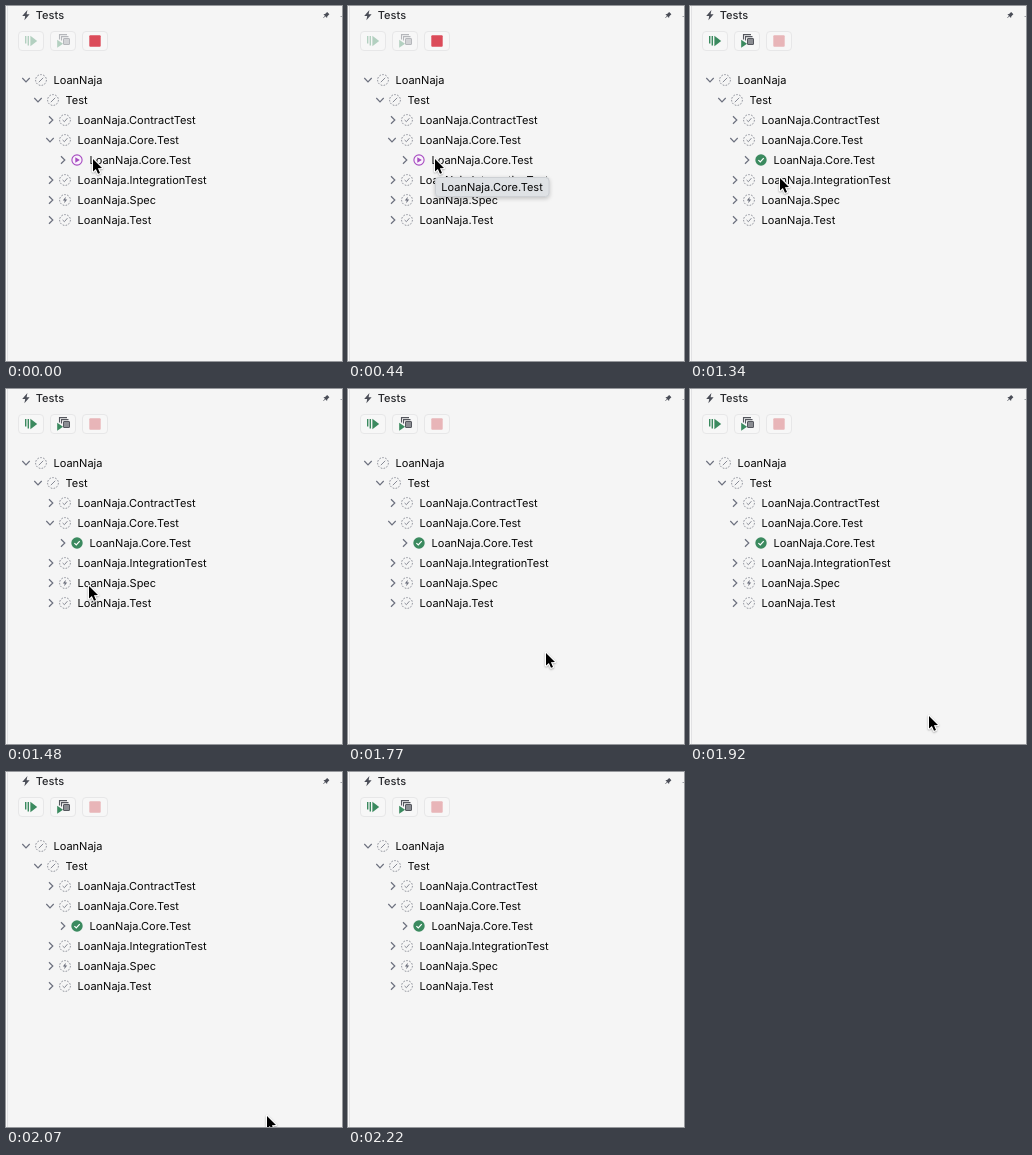
These frames come from a looping animation (336x355 px, 2510 ms). An HTML page with a canvas:

```html
<!DOCTYPE html>
<html lang="en">
<head>
<meta charset="utf-8">
<title>Test tree</title>
<style>
  html, body { margin: 0; width: 100%; height: 100%; overflow: hidden; background: #f5f5f5; }
  canvas { display: block; width: 336px; height: 355px; }
</style>
</head>
<body>
<canvas id="stage"></canvas>
<script>
const W = 336, H = 355, LOOP = 2510;
const TIP_AT = 440, DONE_AT = 1340;

// Pointer position from each time on; it is off stage after the last one.
const POINTER = [
  [0, 85, 152], [1340, 88, 171], [1480, 81, 196], [1630, 81, 169],
  [1770, 196, 263], [1920, 237, 326], [2070, 259, 343], [2220, 400, 400]
];

// Rows: label, icon x, y, chevron, mark
const ROWS = [
  ['LoanNaja', 35, 74, 'down', 'slash'],
  ['Test', 47, 94, 'down', 'slash'],
  ['LoanNaja.ContractTest', 59, 114, 'right', 'check'],
  ['LoanNaja.Core.Test', 59, 134, 'down', 'check'],
  ['LoanNaja.Core.Test', 71, 154, 'right', 'state'],
  ['LoanNaja.IntegrationTest', 59, 174, 'right', 'check'],
  ['LoanNaja.Spec', 59, 194, 'right', 'bolt'],
  ['LoanNaja.Test', 59, 214, 'right', 'check']
];

const canvas = document.getElementById('stage');
const ctx = canvas.getContext('2d');
const scale = window.devicePixelRatio || 1;
canvas.width = Math.round(W * scale);
canvas.height = Math.round(H * scale);
ctx.textRendering = 'geometricPrecision';

function trace(points, close) {
  ctx.beginPath();
  points.forEach(([x, y]) => ctx.lineTo(x, y));
  if (close) ctx.closePath();
}

function fill(points, color) {
  trace(points, true);
  ctx.fillStyle = color;
  ctx.fill();
}

function line(points, color, width = 1.2) {
  trace(points, false);
  ctx.strokeStyle = color;
  ctx.lineWidth = width;
  ctx.stroke();
}

function rect(x, y, w, h, color) {
  ctx.fillStyle = color;
  ctx.fillRect(x, y, w, h);
}

function box(x, y, w, h, r, color, border) {
  ctx.beginPath();
  ctx.roundRect(x, y, w, h, r);
  if (color) { ctx.fillStyle = color; ctx.fill(); }
  if (border) { ctx.strokeStyle = border; ctx.lineWidth = 1; ctx.stroke(); }
}

function at(x, y, draw) {
  ctx.save();
  ctx.translate(x, y);
  draw();
  ctx.restore();
}

function text(label, x, y, weight = 400, color = '#080808') {
  ctx.font = weight + ' 11px Inter, sans-serif';
  ctx.fillStyle = color;
  ctx.fillText(label, x, y);
}

function disc(r, color) {
  ctx.beginPath();
  ctx.arc(0, 0, r, 0, Math.PI * 2);
  ctx.fillStyle = color;
  ctx.fill();
}

function ring(r, color, width) {
  ctx.beginPath();
  ctx.arc(0, 0, r, 0, Math.PI * 2);
  ctx.strokeStyle = color;
  ctx.lineWidth = width;
  ctx.stroke();
}

function chevron(dir) {
  const down = [[-3.7, -2], [0, 1.8], [3.7, -2]];
  line(dir === 'down' ? down : down.map(([x, y]) => [y, x]), '#6c707e', 1.2);
}

function statusIcon(mark, done) {
  if (mark === 'state') {
    if (done) {
      disc(5.7, '#3b8a5f');
      line([[-2.6, 0.1], [-0.7, 2], [2.7, -1.8]], '#fff', 1.2);
    } else {
      disc(5.2, '#faf3fc');
      ring(5.1, '#a64bc0', 1.1);
      fill([[-1.7, -2.7], [2.8, 0], [-1.7, 2.7]], '#a64bc0');
    }
    return;
  }
  const gray = '#7c7f8b';
  ctx.setLineDash([1.6, 1.4]);
  ring(5.4, gray, 0.9);
  ctx.setLineDash([]);
  if (mark === 'slash') line([[-2.2, 2.2], [2.2, -2.2]], gray, 0.9);
  if (mark === 'check') line([[-2.4, 0], [-0.6, 1.7], [2.4, -1.8]], gray, 0.9);
  if (mark === 'bolt') fill([[0.8, -3.2], [-2.2, 0.6], [-0.3, 0.6], [-0.8, 3.2], [2.2, -0.6], [0.3, -0.6]], '#6c6f7c');
}

function header() {
  rect(0, 0, 1, H, '#f9f9f9');
  rect(1, 0, 1, H, '#e2e2e4');
  fill([[21.4, 4], [16.2, 10], [19.2, 10], [18.4, 14.2], [23.6, 8.2], [20.6, 8.2]], '#4a4d57');
  text('Tests', 29.8, 13, 500, '#26272b');
  at(320, 9.3, () => {
    ctx.rotate(Math.PI / 4);
    ctx.scale(0.8, 0.8);
    fill([[-2, -4], [2, -4], [2, -0.4], [3.2, 1.4], [-3.2, 1.4], [-2, -0.4]], '#4a4d57');
    line([[0, 1], [0, 4.4]], '#4a4d57', 1);
  });
  rect(334.5, 10, 1.5, 1, '#a0a2a8');
}

function toolbar(done) {
  for (const x of [25, 57, 89]) box(x - 12.5, 25.5, 25, 19, 3.5, '#f7f7f7', '#e7e7e8');
  const green = done ? '#3b8a5f' : '#b3d0c0';
  const gray = done ? '#55575e' : '#b5b7bb';

  rect(19, 30, 1.4, 7.5, green);
  rect(21.6, 30, 1.4, 9.5, green);
  fill([[24.4, 29.8], [31.2, 35], [24.4, 40.2]], green);

  // Stacked sheets, back to front, with the play mark at the corner
  line([[53.5, 33.5], [53.5, 28.6], [61, 28.6]], gray, 1.1);
  line([[55.5, 34.5], [55.5, 30.6], [62.5, 30.6]], gray, 1.1);
  box(57.5, 32.5, 6, 6, 0.5, done ? '#8b8d92' : '#d2d3d6', gray);
  fill([[51.2, 33.8], [57, 37.8], [51.2, 41.8]], green);

  box(83.3, 29.3, 11.4, 11.4, 1, done ? '#e8b5b8' : '#db4b59');
}

function tree(done) {
  for (const [label, x, y, dir, mark] of ROWS) {
    at(x - (dir === 'down' ? 15 : 14), y, () => chevron(dir));
    at(x, y, () => statusIcon(mark, done));
    text(label, x + 12.5, y + 4);
  }
}

function tooltip() {
  ctx.save();
  ctx.shadowColor = 'rgba(0,0,0,0.22)';
  ctx.shadowBlur = 4 * scale;
  ctx.shadowOffsetY = 1.5 * scale;
  box(87, 171, 114.5, 20, 4, '#dfe2e5');
  ctx.restore();
  box(87.5, 171.5, 113.5, 19, 3.5, null, '#cdd0d4');
  text('LoanNaja.Core.Test', 93.3, 185);
}

function pointer(x, y) {
  at(x, y, () => {
    trace([[2, 1], [2, 13.6], [4.9, 11], [7, 15.8], [9, 15], [6.9, 10.3], [11, 10]], true);
    ctx.lineJoin = 'round';
    ctx.shadowColor = 'rgba(0,0,0,0.35)';
    ctx.shadowBlur = 2 * scale;
    ctx.shadowOffsetY = 0.7 * scale;
    ctx.strokeStyle = '#fff';
    ctx.lineWidth = 2.2;
    ctx.stroke();
    ctx.shadowColor = 'transparent';
    ctx.fillStyle = '#000';
    ctx.fill();
  });
}

function draw(t) {
  const done = t >= DONE_AT;
  ctx.setTransform(scale, 0, 0, scale, 0, 0);
  rect(0, 0, W, H, '#f5f5f5');
  header();
  toolbar(done);
  tree(done);
  if (t >= TIP_AT && !done) tooltip();
  const [, x, y] = POINTER.filter(p => p[0] <= t).pop();
  pointer(x, y);
}

const start = performance.now();
function tick() {
  draw((performance.now() - start) % LOOP);
  requestAnimationFrame(tick);
}
tick();
</script>
</body>
</html>
```
